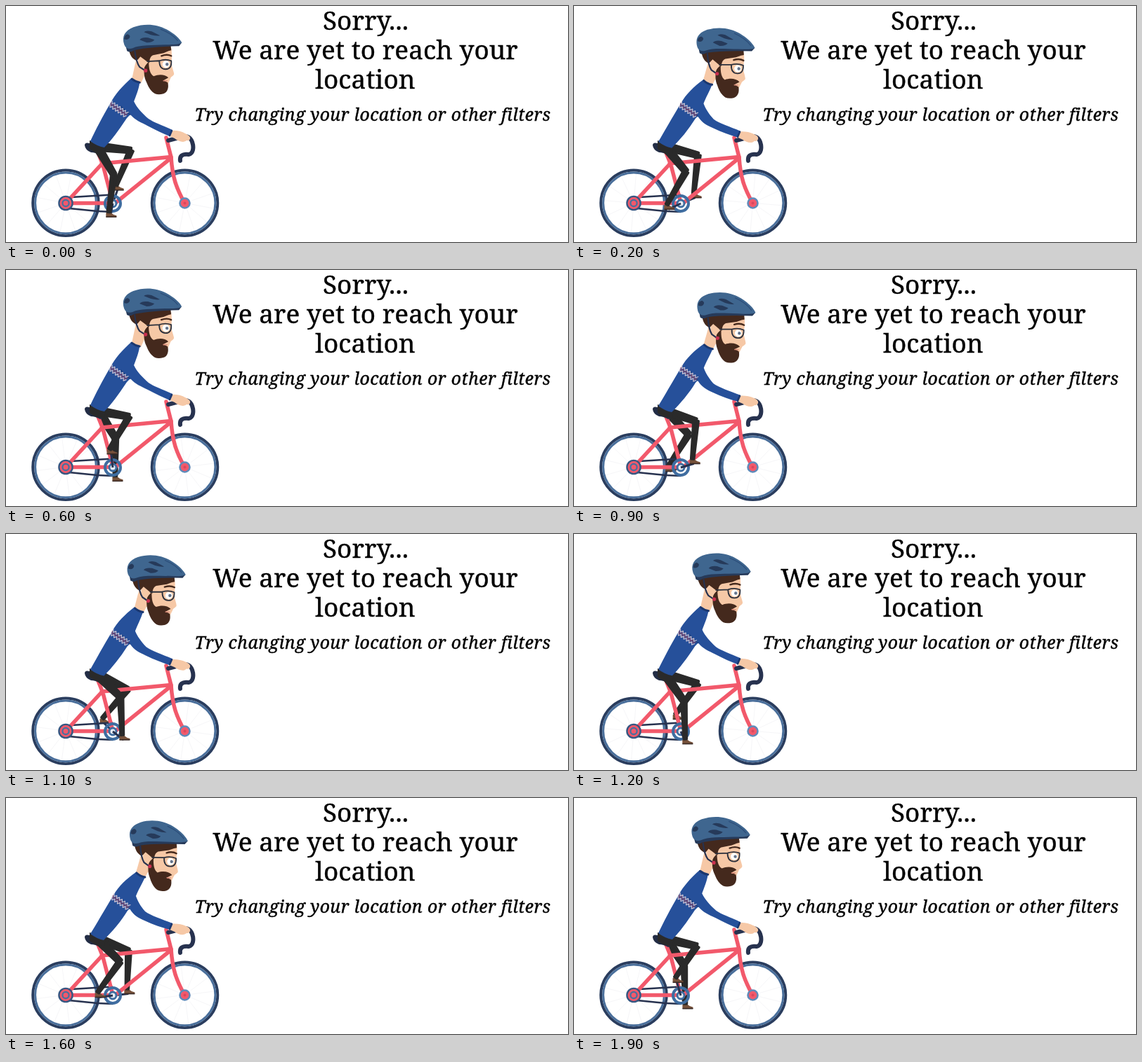
An HTML page that plays this animation: 800 px wide and 337 px high, repeating every 2000 ms.

```html
<!DOCTYPE html>
<html lang="en">
<head>
<meta charset="utf-8">
<title>Location not reached</title>
<style>
html, body { margin: 0; width: 100%; height: 100%; overflow: hidden; background: #fff; }
svg { display: block; width: 100vw; height: 100vh; }
text { font-family: "Noto Serif", serif; text-anchor: middle; fill: #000; stroke: #000; stroke-width: .4px; }
.big { font-size: 36.9px; letter-spacing: .1px; }
.small { font-size: 24.7px; font-style: italic; letter-spacing: .5px; }
.line { fill: none; stroke-linecap: round; stroke-linejoin: round; }
.red { stroke: #f2596b; stroke-width: 5.5; }
.navy { stroke: #27324f; }
.skin { fill: #f6c8a6; }
.hair { fill: #44291d; }
.slot { fill: #263a5a; }
.leg path { fill: #2a2a2a; stroke: #2a2a2a; stroke-width: 4; stroke-linejoin: round; }
.leg .shoe { fill: #76513a; stroke: none; }
.leg .sole { stroke: #3a2a25; stroke-width: 1.6; }
.leg .crank { stroke: #27324f; stroke-width: 3; }
</style>
</head>
<body>
<svg viewBox="0 0 800 337" preserveAspectRatio="xMidYMid meet">
  <defs>
    <g id="wheel">
      <circle r="46.8" fill="none" stroke="#2a3d5e" stroke-width="3.9"/>
      <circle r="43.4" fill="none" stroke="#4a6f9b" stroke-width="3"/>
    </g>
  </defs>

  <g class="line" stroke="#f6f6f8" id="spokes"></g>
  <use href="#wheel" x="85" y="281.3"/>
  <use href="#wheel" x="254.5" y="281.3"/>

  <g id="farLeg" class="leg"></g>

  <path class="line navy" stroke-width="2.4" d="M85 273.5L151 269.5M85 288.5L130 293L152 294"/>
  <path class="line red" d="M130 207L138 227L152 281M136 226L85 281.5H152M136 225L235 215.5M235 217L156 281"/>
  <path class="line red" d="M228 188L235 216C237 245 242 259 254 281"/>
  <path d="M112 199Q112 194 119 196L138 203Q140 212 134 213Q127 209 121 209Q113 206 112 199Z" fill="#232d45"/>

  <circle cx="85" cy="281.5" r="9.6" fill="#f2596b" stroke="#365782" stroke-width="2.4"/>
  <circle cx="85" cy="281.5" r="4.6" fill="#f2596b" stroke="#46719f" stroke-width="2.2"/>
  <circle cx="254.5" cy="281.5" r="7" fill="#f2596b" stroke="#5f8bba" stroke-width="2.6"/>
  <circle cx="254.5" cy="281.5" r="2" fill="#d9485e"/>

  <circle cx="152" cy="282" r="11" fill="none" stroke="#3f6da0" stroke-width="4"/>
  <circle cx="152" cy="282" r="5" fill="#e8eef5" stroke="#3f6da0" stroke-width="3"/>

  <path class="line navy" stroke-width="6" d="M231 192L246 188C256 184 262 186 265 194C268 203 266 211 260 212C251 211 247 214 248 221"/>

  <g id="nearLeg" class="leg"></g>
  <path d="M119 192L142 200L140 211Q128 212 119 204Z" fill="#2a2a2a"/>

  <g id="head">
    <path class="skin" d="M185 76L179 104Q185 110 192 110L200 92Z"/>
    <path class="skin" d="M186 68L235 60C236 68 236 74 235 81C236 88 239 94 239 97C238 100 234 101 234 103L230 112L206 114L190 90Z"/>
    <path class="hair" d="M174 60C176 70 179 75 186 78L191 72L199 78L204 81C204 76 205 72 209 70L224 67L231 64L235 63L234 54L176 56Z"/>
    <path class="hair" d="M197 86L203 79C203 90 205 97 210 100C217 97 226 97 231 102L224 106L230 109C232 116 230 123 224 125Q217 127 212 125C207 122 203 117 200 109C196 101 196 94 197 86Z"/>
    <path class="line" d="M224 106.5L229 106.5" stroke="#d88a78" stroke-width="1.6"/>
    <ellipse class="skin" cx="194" cy="82" rx="4.6" ry="6.5"/>
    <path class="line" d="M221 71Q229 68 235 71" stroke="#44291d" stroke-width="2.4"/>
    <circle cx="227.5" cy="83" r="5" fill="#fff"/>
    <circle cx="229" cy="83" r="2.2" fill="#64748c"/>
    <path class="line" d="M201 79L218 78Q227 75 235 78Q236 90 227 90Q218 90 218 78" stroke="#2b303c" stroke-width="1.8"/>
    <path class="line navy" d="M183 64Q185 80 190 87L198 92" stroke-width="2.2"/>
    <circle cx="198.5" cy="92" r="2.6" fill="#c9304f"/>
    <path class="slot" d="M169 53L172 64Q177 67 182 63Q205 58 246 57L250 52Z"/>
    <path fill="#3f668f" d="M168 55C164 43 169 35 181 30C198 24 215 26 228 33C239 39 247 46 250 52C246 55 236 55 226 55C208 56 190 55 180 60C174 62 170 60 168 55Z"/>
    <path class="slot" d="M190 48Q193 44 202 45L211 48Q208 52 200 52ZM196 37Q199 34 207 36L219 42Q214 43 206 41ZM168 47Q168 41 173 40Q178 42 175 46Q172 49 168 47Z"/>
    <path class="line" d="M220 33Q236 39 244 49" stroke="#2d4f7b" stroke-width="1.4"/>
  </g>

  <path id="hand" class="skin"/>
  <path id="torso" fill="#26509a"/>
  <path id="fold" class="line" stroke="#1c407f" stroke-width="1.4"/>
  <path id="collar" class="line" stroke="#1a376f" stroke-width="3"/>
  <path id="cuff" class="line" stroke="#1a376f" stroke-width="2.6"/>
  <path id="zigLight" class="line" stroke="#cfc3d2" stroke-width="1.2"/>
  <path id="zigDark" class="line" stroke="#84486a" stroke-width="1.1"/>

  <text class="big" x="512" y="33.5">Sorry...</text>
  <text class="big" x="511.5" y="75.5">We are yet to reach your</text>
  <text class="big" x="511.5" y="117.5">location</text>
  <text class="small" x="522" y="164">Try changing your location or other filters</text>
</svg>
<script>
const LOOP = 2000, STEP = 100, LEAD = 40, TURN = 4000 / 3;
const HUB = [152, 282], CRANK = 19.5, THIGH = 46, CALF = 54;
const $ = id => document.getElementById(id);
const lerp = (a, b, k) => a + (b - a) * k;
const set = (id, d) => $(id).setAttribute("d", d);

// Upright and leaning versions of each flexible part
const poses = {
  torso: [
    "M178 103C166 114 155 126 149 138C137 158 127 178 120 193Q129 200 140 202C150 192 160 178 172 160L177 155C184 163 192 166 202 171C213 177 224 182 233 186L237 177C222 170 210 166 203 161C195 154 186 145 182 136C185 128 189 118 190 109Z",
    "M185 106C172 115 160 126 153 139C140 160 129 180 120 194Q129 201 139 203C152 190 164 176 173 161L176 158C182 168 188 171 197 175C210 181 222 185 233 188L237 179C222 173 206 168 198 162C191 154 187 146 185 140C188 132 194 122 198 113Z"],
  collar: ["M179 104Q184 108 190 109", "M186 107Q191 112 198 113"],
  cuff: ["M236 178L233 185", "M236 180L233 187"],
  fold: ["M164 143Q170 151 177 155", "M167 146Q171 154 176 158"],
  hand: [
    "M234 178C243 177 252 179 260 185C264 188 262 193 257 192C253 196 245 193 240 189L233 186Z",
    "M234 180C243 179 252 180 260 185C264 188 262 194 257 193C253 197 245 195 240 191L233 188Z"]
};

function blend([a, b], k) {
  const to = b.match(/[\d.]+/g);
  let i = 0;
  return a.replace(/[\d.]+/g, n => lerp(+n, +to[i++], k).toFixed(2));
}

function zigzag(x, y, dx, dy, count) {
  const len = Math.hypot(dx, dy);
  let d = "";
  for (let i = 0; i <= count; i++) {
    const u = i / count, off = (i % 2 ? 1.7 : -1.7) / len;
    d += (i ? "L" : "M") + (x + dx * u - dy * off).toFixed(2) + " " + (y + dy * u + dx * off).toFixed(2);
  }
  return d;
}

function taper([x1, y1], [x2, y2], w1, w2) {
  const len = Math.hypot(x2 - x1, y2 - y1) || 1;
  const nx = (y1 - y2) / len, ny = (x2 - x1) / len;
  const p = (x, y, w) => (x + nx * w).toFixed(2) + " " + (y + ny * w).toFixed(2);
  return `M${p(x1, y1, w1)}L${p(x2, y2, w2)}L${p(x2, y2, -w2)}L${p(x1, y1, -w1)}Z`;
}

function kneeOf([hx, hy], [ax, ay]) {
  const dist = Math.min(Math.hypot(ax - hx, ay - hy), THIGH + CALF - .05);
  const bend = Math.acos((THIGH ** 2 + dist ** 2 - CALF ** 2) / (2 * THIGH * dist));
  const dir = Math.atan2(ay - hy, ax - hx) - bend;
  return [hx + THIGH * Math.cos(dir), hy + THIGH * Math.sin(dir)];
}

function drawLeg(id, hip, angle, shift) {
  const px = HUB[0] + shift + CRANK * Math.cos(angle), py = HUB[1] + CRANK * Math.sin(angle);
  const ankle = [px - 2, py - 7], knee = kneeOf(hip, ankle);
  $(id).innerHTML =
    `<path class="crank" d="M${HUB}L${px} ${py}"/>` +
    `<path class="shoe" d="M${px - 6} ${py}v-6q4 -2 7 0q3 3 8 4v2z"/>` +
    `<path class="sole" d="M${px - 6} ${py}h15"/>` +
    `<path d="${taper(hip, knee, 5, 3.5)}"/><path d="${taper(knee, ankle, 3.4, 1.8)}"/>`;
}

function drawSpokes(angle) {
  let d = "";
  for (const cx of [85, 254.5])
    for (let i = 0; i < 12; i++) {
      const a = angle + i * Math.PI / 6, c = Math.cos(a), s = Math.sin(a);
      d += `M${cx + 11 * c} ${281.3 + 11 * s}L${cx + 41 * c} ${281.3 + 41 * s}`;
    }
  $("spokes").innerHTML = `<path d="${d}"/>`;
}

function draw(t) {
  const turn = (t + LEAD) / TURN * 2 * Math.PI;
  const lean = (1 - Math.cos(turn * 2)) / 2;
  const angle = Math.PI / 2 + turn;

  for (const id in poses) set(id, blend(poses[id], lean));
  $("head").setAttribute("transform", `translate(${7.5 * lean} ${6.5 * lean}) rotate(${4 * lean} 208 75)`);

  const x = lerp(150, 153, lean), y = lerp(137, 138, lean);
  set("zigLight", zigzag(x, y, 23, 16, 12) + zigzag(x - 3, y + 5, 23, 16, 12));
  set("zigDark", zigzag(x - 1.5, y + 2.5, 23, 16, 12));

  drawLeg("farLeg", [132, 201], angle + Math.PI, 3);
  drawLeg("nearLeg", [130, 201], angle, 0);
  drawSpokes(turn);
}

const start = performance.now();
function tick() {
  const t = (performance.now() - start) % LOOP;
  draw(Math.floor(t / STEP) * STEP);
  requestAnimationFrame(tick);
}
tick();
</script>
</body>
</html>
```
